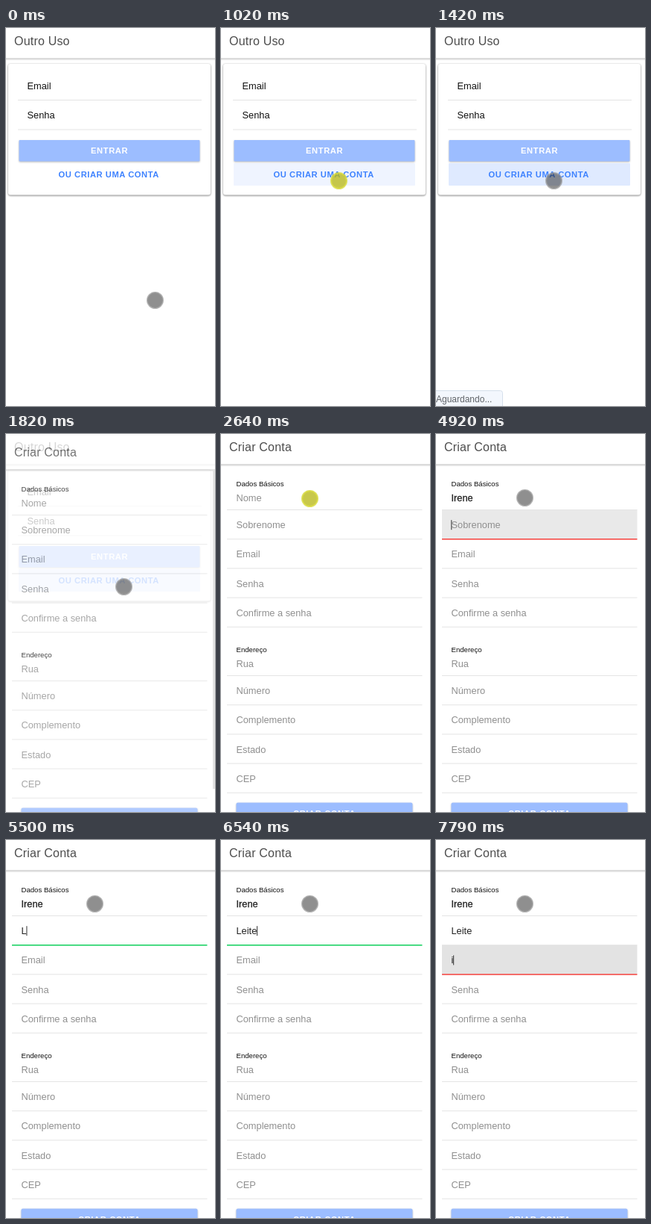
These frames come from a looping animation (281x506 px, 7.99 s). An HTML page:

```html
<!DOCTYPE html>
<html lang="pt">
<head>
<meta charset="utf-8">
<style>
  html, body { margin: 0; width: 100%; height: 100%; overflow: hidden; background: #fff; }
  svg { display: block; width: 281px; height: 506px; font: 12.8px "Liberation Sans", Arial, sans-serif; }
  .title { font-size: 16px; letter-spacing: .2px; fill: #4c4c4c; }
  .group { font-size: 9.6px; fill: #111; }
  .button { font-size: 11.2px; font-weight: bold; letter-spacing: .6px; }
  .bar { filter: drop-shadow(0 1px 1px rgba(0, 0, 0, .32)); }
  .card { filter: drop-shadow(0 1px 1px rgba(0, 0, 0, .42)) drop-shadow(0 0 1px rgba(0, 0, 0, .15)); }
  .raised { filter: drop-shadow(0 1px 1px rgba(0, 0, 0, .28)); }
</style>
</head>
<body>
<svg viewBox="0 0 281 506">
  <g id="login">
    <rect class="bar" x="-5" y="-5" width="291" height="45.5" fill="#fff"/>
    <text class="title" x="11" y="22.5">Outro Uso</text>
    <rect class="card" x="3" y="48" width="272" height="175.5" rx="3" fill="#fff"/>
    <path d="M16 96.5H263M16 136H263" stroke="#e4e4e4"/>
    <text x="28.5" y="82" fill="#111">Email</text>
    <text x="28.5" y="121" fill="#111">Senha</text>
    <rect class="raised" x="17.5" y="150" width="243" height="28.5" rx="1" fill="#9cbdff"/>
    <text class="button" x="114" y="168" fill="#fff">ENTRAR</text>
    <rect id="hover" x="17" y="181" width="244" height="30" rx="1" fill="#dfeaff"/>
    <text class="button" x="70.5" y="200" fill="#3f83ff" style="letter-spacing:.55px">OU CRIAR UMA CONTA</text>
  </g>
  <g id="status">
    <path d="M-1 485.5H86.500q3 0 3 3V507H-1z" fill="#f3f7fd" stroke="#d5dfeb"/>
    <text x="0" y="501" fill="#5f6368" font-size="12">Aguardando...</text>
  </g>
  <g id="signup">
    <rect width="281" height="550" fill="#fff"/>
    <rect class="bar" x="-5" y="-5" width="291" height="45.5" fill="#fff"/>
    <text class="title" x="11" y="22.5">Criar Conta</text>
    <text class="group" x="20.5" y="70">Dados Básicos</text>
    <text class="group" x="20.5" y="291.500">Endereço</text>
    <g id="rows"></g>
    <rect class="raised" x="20.5" y="493.500" width="237" height="29" rx="2" fill="#9cbdff"/>
    <text class="button" x="97" y="511.500" fill="#fff">CRIAR CONTA</text>
    <path id="scrollbar" d="M279.500 40V468" stroke="#dcdcdc" stroke-width="3"/>
  </g>
  <path id="caret" stroke="#333"/>
  <circle id="pointer" r="10.4" stroke-width="2.200"/>
</svg>
<script>
const LOOP = 7990;
const RED = '#f5413d', GREEN = '#10cf5c';
const $ = id => document.getElementById(id);
const set = (el, attrs) => { for (const k in attrs) el.setAttribute(k, attrs[k]); };
const show = (el, on) => set(el, { visibility: on ? 'visible' : 'hidden' });

function add(tag, attrs) {
  const el = document.createElementNS('http://www.w3.org/2000/svg', tag);
  set(el, attrs);
  return $('rows').appendChild(el);
}

function makeRow(hint, line, base, top) {
  return {
    hint, base,
    fill: add('rect', { x: 8, y: top, width: 262.5, height: line - top }),
    rule: add('path', { d: `M8 ${line}H270.5` }),
    text: add('text', { x: 20.5, y: base })
  };
}

function makeGroup(hints, first) {
  return hints.map((hint, i) => {
    const line = first + i * 39.2;
    return makeRow(hint, line, line - (i ? 14.5 : 11.7), line - 39.2);
  });
}

const rows = [
  ...makeGroup(['Nome', 'Sobrenome', 'Email', 'Senha', 'Confirme a senha'], 101.5),
  ...makeGroup(['Rua', 'Número', 'Complemento', 'Estado', 'CEP'], 323.5)
];

// Per field: focus span, time it becomes valid, key times
const entries = [
  { word: 'Irene', from: 2860, to: 4920, valid: 3470, keys: [3270, 3670, 3890, 4100, 4300] },
  { word: 'Leite', from: 4920, to: 6970, valid: 5500, keys: [5300, 5940, 6140, 6340, 6540] },
  { word: 'i', from: 6970, to: LOOP, valid: LOOP, keys: [7790] }
];
// [time, value] lists; each value holds until the next
const fills = [
  [[0, 'none'], [4720, '#e9e9e9'], [4920, 'none']],
  [[0, 'none'], [4920, '#e9e9e9'], [5300, '#e3e3e3'], [5500, 'none']],
  [[0, 'none'], [6970, '#f0f0f0'], [7170, '#e3e3e3']]
];
const path = [
  [0, [200.5, 364.5]], [200, [190, 325]], [400, [168, 242]], [620, [158.5, 204.5]],
  [2240, [140, 146]], [2440, [119.5, 86.5]], [2860, [119.5, 85.5]]
];
const page = [[0, [0, 40]], [1620, [.03, 38]], [1820, [.78, 7]], [2020, [1, 0]]];
const hover = [[0, 0], [1020, .5], [1220, 1]];

const hold = (list, t) => list.filter(([at]) => t >= at).pop()[1];
const within = (t, a, b) => t >= a && t < b;

function drawRow(row, i, t) {
  const e = entries[i];
  const word = e ? e.word.slice(0, e.keys.filter(k => t >= k).length) : '';
  const focused = e && within(t, e.from, e.to);
  row.text.textContent = word || row.hint;
  const strong = i === 0 && word;
  set(row.text, {
    fill: word ? '#222' : '#8f8f8f',
    stroke: strong ? '#222' : 'none',
    'stroke-width': .3
  });
  set(row.fill, { fill: e ? hold(fills[i], t) : 'none' });
  set(row.rule, {
    stroke: focused ? (t < e.valid ? RED : GREEN) : '#e4e4e4',
    'stroke-width': focused ? 1.5 : 1
  });
  if (focused) {
    const x = 20.8 + (word ? row.text.getComputedTextLength() : 0);
    set($('caret'), { d: `M${x} ${row.base - 11}v13` });
  }
}

function draw() {
  const t = performance.now() % LOOP;
  const [opacity, shift] = hold(page, t);
  const [cx, cy] = hold(path, t);
  const pressed = within(t, 1020, 1220) || within(t, 2640, 2860);

  set($('hover'), { opacity: hold(hover, t) });
  show($('status'), within(t, 1420, 1620));
  set($('signup'), { opacity, transform: `translate(0 ${shift})` });
  show($('scrollbar'), within(t, 1820, 2020));
  rows.forEach((row, i) => drawRow(row, i, t));
  show($('caret'), t >= 2860 && !within(t, 7570, 7790));
  set($('pointer'), {
    cx, cy,
    fill: pressed ? 'rgba(184,184,24,.78)' : 'rgba(40,40,40,.52)',
    stroke: pressed ? 'rgba(215,218,60,.8)' : 'rgba(150,150,150,.7)'
  });
  requestAnimationFrame(draw);
}
draw();
</script>
</body>
</html>
```
